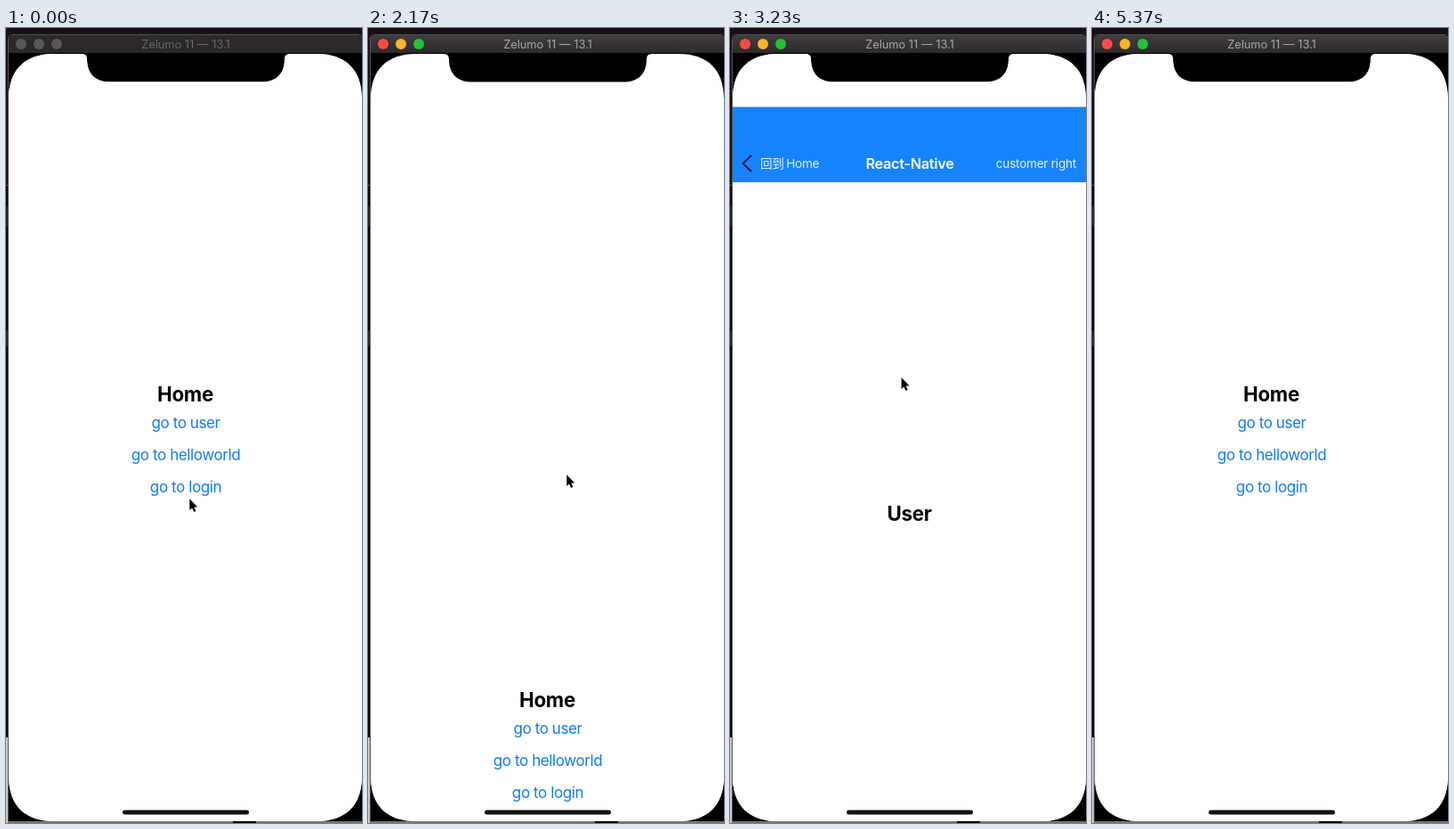
Recreate the animation shown at these times as an HTML page. Size 400 by 892 pixels, loop 5560 ms.

```html
<!DOCTYPE html>
<html lang="en">
<head>
<meta charset="utf-8">
<title>Simulator navigation</title>
<style>
  html, body { margin: 0; width: 100%; height: 100%; overflow: hidden; background: #000; }
  svg { display: block; width: 400px; height: 892px; }
  text { font-family: Inter, "Noto Sans CJK SC", "Noto Sans CJK", sans-serif; white-space: pre; }
  .heading { font-size: 22.3px; font-weight: 700; letter-spacing: -.3px; text-anchor: middle; }
  .link { font-size: 17px; letter-spacing: -.4px; text-anchor: middle; fill: #0f7cf0; }
  .cjk { font-size: 17.3px; letter-spacing: 0; }
  .bar { font-size: 13.5px; letter-spacing: -.2px; fill: #e9f3ff; }
  .back { word-spacing: -1px; }
  .barTitle { font-size: 16.3px; font-weight: 600; letter-spacing: -.3px; text-anchor: middle; fill: #fff; }
  .clock { font-size: 16px; font-weight: 600; fill: #fff; }
  .window { font-size: 12.8px; text-anchor: middle; }
</style>
</head>
<body>
<svg viewBox="0 0 400 892">
  <defs>
    <clipPath id="screen">
      <path d="M3 80C3 47 21 29 54 29H85Q91 29 91 35C91 52 101 60.6 117 60.6H287C303 60.6 313 52 313 35Q313 29 319 29H349C382 29 400 47 400 80V839C400 872 382 890 349 890H54C21 890 3 872 3 839Z"/>
    </clipPath>
    <linearGradient id="chrome" x2="0" y2="1">
      <stop stop-color="#403e40"/><stop offset="1" stop-color="#2c2a2c"/>
    </linearGradient>
  </defs>

  <!-- desktop behind the window -->
  <rect width="400" height="892" fill="#0b090c"/>
  <rect width="400" height="8" fill="#180f17"/>
  <rect y="8" width="3" height="168" fill="#1c0e17"/>
  <rect y="176" width="3" height="1" fill="#5b575c"/>
  <rect y="200" width="2" height="23" fill="#252328"/>
  <rect y="340" width="2" height="17" fill="#2c2a2f"/>
  <rect y="796" width="2" height="96" fill="#c9c9c9"/>
  <rect x="2" y="890" width="398" height="2" fill="#777"/>
  <rect x="255" y="890" width="26" height="2" fill="#000"/>

  <!-- window -->
  <path d="M3 890V12Q3 7 8 7H395Q400 7 400 12V890Z" fill="#000"/>
  <path d="M2.5 890V12Q2.5 7.5 8 7.5H395Q400 7.5 400 12" fill="none" stroke="#555356"/>
  <path id="titleBar" d="M3 28V12Q3 8 8 8H395Q400 8 400 12V28Z"/>
  <g id="lights"><circle cx="17" cy="18" r="6"/><circle cx="37" cy="18" r="6"/><circle cx="57" cy="18" r="6"/></g>
  <text id="title" class="window" x="202" y="22.8">Zelumo 11 — 13.1</text>

  <g clip-path="url(#screen)">
    <rect x="3" y="29" width="397" height="861" fill="#fff"/>
    <g id="home">
      <rect x="3" y="29" width="397" height="861" fill="#fff"/>
      <text class="heading" x="201.5" y="418.5">Home</text>
      <text id="toUser" class="link" x="202" y="448.5">go to user</text>
      <text class="link" x="202" y="485">go to helloworld</text>
      <text id="toLogin" class="link" x="202" y="521">go to login</text>
    </g>
    <g id="login">
      <rect x="3" y="29" width="397" height="861" fill="#fff"/>
      <rect x="3" y="113" width="397" height="1" fill="#c4c4c4"/>
      <text class="heading" x="201.5" y="476.5">Login</text>
      <text id="toHome" class="link cjk" x="201.5" y="505.5">回到首页</text>
    </g>
    <g id="user">
      <rect x="3" y="29" width="397" height="861" fill="#fff"/>
      <rect x="3" y="29" width="397" height="84.5" fill="#1683ff"/>
      <path d="M24 83.5L14.5 92.5L24 101.5" fill="none" stroke="#0b1c33" stroke-width="1.9"/>
      <text class="bar back" x="34" y="97">回到 Home</text>
      <text class="barTitle" x="202" y="98">React-Native</text>
      <text class="bar" x="389" y="97" text-anchor="end">customer right</text>
      <text class="heading" x="201.5" y="493.5">User</text>
    </g>

    <!-- status bar: white, so it shows only over the blue header -->
    <text class="clock" x="36" y="58.8">7:52</text>
    <g fill="#fff">
      <g opacity=".35"><circle cx="319" cy="57" r="1.8"/><circle cx="324" cy="57" r="1.8"/><circle cx="329" cy="57" r="1.8"/><circle cx="334" cy="57" r="1.8"/></g>
      <path d="M347 59L344.3 56.2Q347 54 349.7 56.2Z"/>
      <g fill="none" stroke="#fff" stroke-width="2"><path d="M342.5 54.2Q347 50.2 351.5 54.2M339.7 51.2Q347 44.6 354.3 51.2"/></g>
      <rect x="359.5" y="47.5" width="23" height="11" rx="3" fill="none" stroke="#fff" stroke-opacity=".45"/>
      <rect x="361" y="49" width="20" height="8" rx="1.8"/>
      <path d="M384 51Q386 53 384 55Z" opacity=".5"/>
    </g>
    <rect x="131" y="877.5" width="142" height="5" rx="2.5" fill="#000" opacity=".93"/>
  </g>

  <path id="cursor" d="M.3 .3V13L3.1 10.4L5.2 15L7.3 14.1L5.3 9.6H9.2Z" fill="#000" stroke="#fff" stroke-width="1" stroke-linejoin="round" paint-order="stroke"/>
</svg>

<script>
const LOOP = 5560, FRAME = 1000 / 30, HEIGHT = 861, OMEGA = Math.sqrt(1000 / 3);
const FOCUS = 400, OPEN_LOGIN = 566, RESET_HOME = 2055.6, OPEN_USER = 2995.2, CLOSE_USER = 4191.5, CURSOR_GONE = 5200;

// time, x, y of the pointer tip
const POINTER = [
  [0, 206, 528], [380, 209, 514], [620, 210, 514], [1100, 234, 589], [1260, 234, 589],
  [1367, 232, 534], [1580, 226, 482], [1800, 223, 501], [2390, 223, 501], [2560, 227, 562],
  [2880, 215, 445], [3070, 214, 443], [3160, 212, 436], [3540, 110, 208], [4030, 70, 105],
  [4150, 71, 91], [4680, 71, 91], [5200, 32, 16]
];

const $ = id => document.getElementById(id);
const clamp = v => Math.min(1, Math.max(0, v));
const easeQuad = v => v < .5 ? 2 * v * v : 1 - 2 * (1 - v) ** 2;

// Distance left in a critically damped spring, ms after its start.
function remaining(ms) {
  const p = OMEGA * Math.max(0, ms) / 1000;
  const d = HEIGHT * Math.exp(-p) * (1 + p);
  return d < .4 ? 0 : d;
}

function pressOpacity(t, start) {
  const down = easeQuad(clamp((t - start) / 150));
  const up = easeQuad(clamp((t - start - 150) / 250));
  return 1 - .8 * (down - up);
}

function pointerAt(t) {
  const i = POINTER.findIndex(p => p[0] > t);
  if (i < 0) return POINTER[POINTER.length - 1].slice(1);
  const [t0, x0, y0] = POINTER[i - 1], [t1, x1, y1] = POINTER[i];
  const k = (t - t0) / (t1 - t0);
  return [x0 + (x1 - x0) * k, y0 + (y1 - y0) * k];
}

const move = (id, x, y) => $(id).setAttribute("transform", `translate(${x} ${y})`);
const show = (id, on) => $(id).style.display = on ? "" : "none";

function draw(t) {
  const active = t >= FOCUS;
  $("titleBar").setAttribute("fill", active ? "url(#chrome)" : "#2b292b");
  $("title").setAttribute("fill", active ? "#a9a7a9" : "#6a686a");
  ["#ff4b47", "#fdb429", "#22c33a"].forEach((color, i) =>
    $("lights").children[i].setAttribute("fill", active ? color : "#59575a"));

  show("login", t >= OPEN_LOGIN && t < RESET_HOME);
  move("login", 0, remaining(t - OPEN_LOGIN));
  move("home", 0, t < RESET_HOME ? 0 : remaining(t - RESET_HOME));
  show("user", t >= OPEN_USER);
  move("user", 0, t < CLOSE_USER ? remaining(t - OPEN_USER) : HEIGHT - remaining(t - CLOSE_USER));

  $("toLogin").style.opacity = pressOpacity(t, 440);
  $("toHome").style.opacity = pressOpacity(t, 1930);
  $("toUser").style.opacity = pressOpacity(t, 2900);

  show("cursor", t < CURSOR_GONE);
  move("cursor", ...pointerAt(t));
}

const onFrame = t => Math.floor((t + 3.5) / FRAME) * FRAME;

const begin = performance.now();
function tick() {
  draw(onFrame((performance.now() - begin) % LOOP));
  requestAnimationFrame(tick);
}
tick();
</script>
</body>
</html>
```
